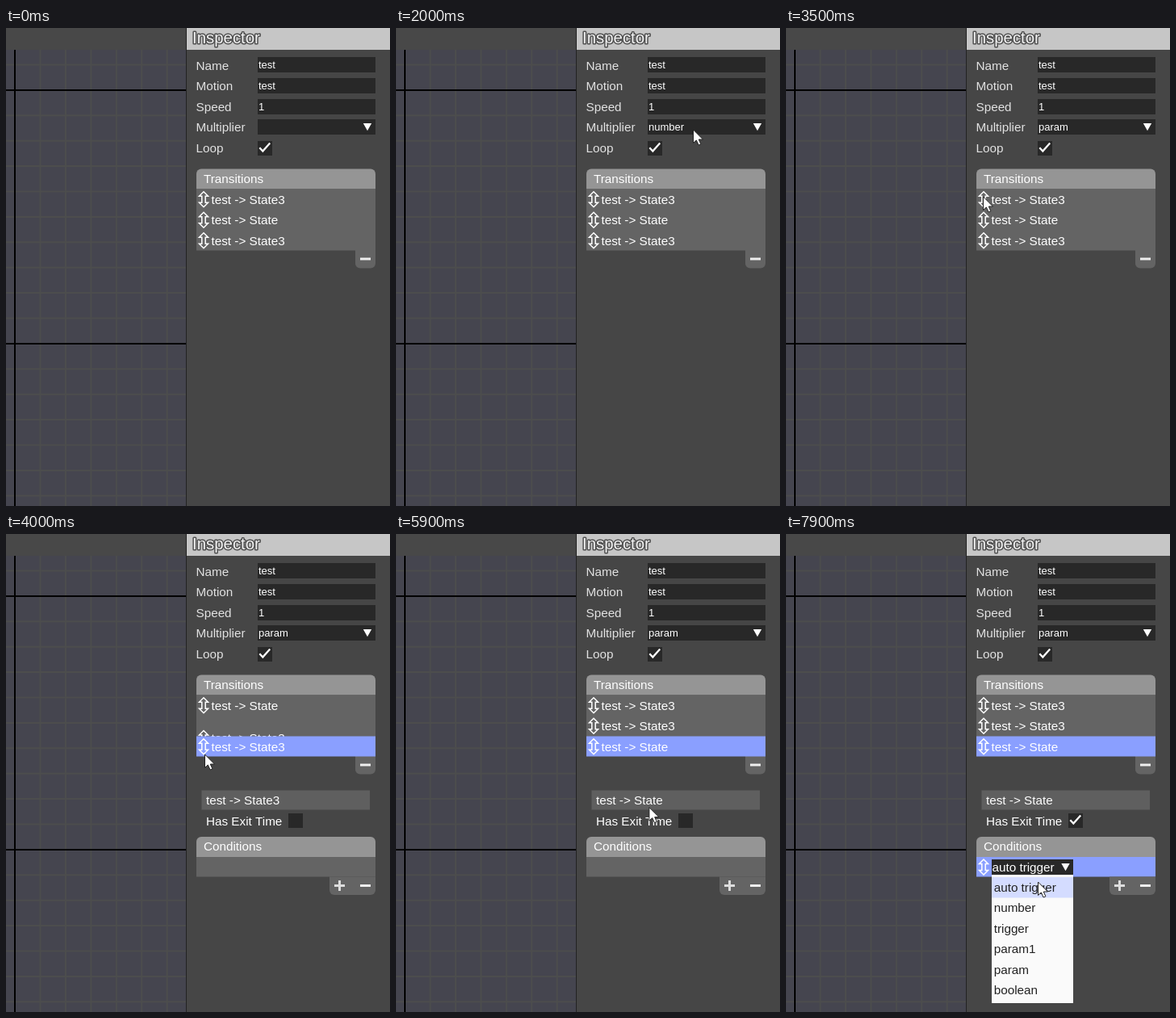
These frames come from a looping animation (476x592 px, 8000 ms). An HTML page with a canvas:

```html
<!DOCTYPE html>
<html>
<head>
<meta charset="utf-8">
<style>
html, body { margin: 0; width: 476px; height: 592px; overflow: hidden; background: #464646; }
canvas { display: block; }
</style>
</head>
<body>
<canvas id="stage" width="476" height="592"></canvas>
<script>
const g = document.getElementById('stage').getContext('2d');
const LOOP = 8000, TICK = 100, ROW = 25.5, LIST_TOP = 199.5;
const BLUE = '#8a9fff', GREY = '#646464', DARK = '#282828';
const FONT = 'px "Liberation Sans", Arial, sans-serif';

const clamp = (v, lo, hi) => Math.min(hi, Math.max(lo, v));
const ramp = (t, start, time) => clamp((t - start) / time, 0, 1);

// Pointer moves: depart, arrive, x, y
const moves = [
  [300, 600, 353, 120], [700, 1100, 362, 201], [1100, 1400, 366, 150], [1600, 2000, 369, 126],
  [2100, 2500, 368, 203], [2700, 3500, 245, 209], [3600, 3900, 247, 273], [4200, 4500, 246, 222],
  [4600, 5300, 249, 284], [5600, 6100, 358, 375], [6200, 6500, 357, 357], [6600, 6900, 416, 437],
  [7100, 7500, 321, 413], [7600, 7900, 313, 431]
];

function pointer(t) {
  let x = 464, y = 87;
  for (const [depart, arrive, toX, toY] of moves) {
    const p = ramp(t, depart, arrive - depart);
    x += (toX - x) * p;
    y += (toY - y) * p;
  }
  return [x, y];
}

// Rows a dragged item has followed the pointer
const drag = (t, grab, drop) =>
  clamp((pointer(clamp(t, grab, drop))[1] - pointer(grab)[1]) / ROW, 0, 2);

const transitions = [
  { name: 'test -> State3', slot: t => drag(t, 3600, 4200) - ramp(t, 5050, 250) },
  { name: 'test -> State', slot: t => 1 - ramp(t, 3700, 200) + drag(t, 4600, 5300) },
  { name: 'test -> State3', slot: t => 2 - ramp(t, 3900, 250) - ramp(t, 4800, 150) }
];

function box(x, y, w, h, color, radii = 0) {
  g.fillStyle = color;
  g.beginPath();
  g.roundRect(x, y, w, h, radii);
  g.fill();
}

function text(s, x, y, size = 15.25, color = '#fff') {
  g.font = size + FONT;
  g.fillStyle = color;
  g.fillText(s, x, Math.floor(y));
}

function shape(points, x, y, fill, stroke, width, open) {
  g.beginPath();
  points.forEach(([px, py]) => g.lineTo(x + px, y + py));
  if (!open) g.closePath();
  if (fill) { g.fillStyle = fill; g.fill(); }
  if (stroke) { g.strokeStyle = stroke; g.lineWidth = width; g.stroke(); }
}

const dropArrow = (x, y) => shape([[-5.2, -4.5], [5.2, -4.5], [0, 4.7]], x, y, '#fff');

function handle(y) {
  const half = [[0, -9.5], [5.5, -4], [2.2, -4], [2.2, 4], [5.5, 4]];
  shape(half.concat(half.map(([px, py]) => [-px, -py])), 245, y, null, '#fff', 1.5);
}

function checkbox(x, y, on) {
  box(x, y, 18, 18, DARK);
  if (on) shape([[2.3, 8.3], [6.3, 12.6], [15.2, 2.6]], x, y, null, '#fff', 2.3, true);
}

function header(s, y) {
  box(236, y, 222, 25, '#959595', [6, 6, 0, 0]);
  text(s, 245, y + 17.5);
}

function buttons(x, y, plus) {
  box(x, y, 458 - x, 22.5, GREY, [0, 0, 6, 6]);
  box(439, y + 9.5, 13, 3, '#eee');
  if (plus) {
    box(407, y + 9.5, 13, 3, '#ddd');
    box(412, y + 4.5, 3, 13, '#ddd');
  }
}

function list(items, x, y, w, pointerY) {
  box(x, y, w, items.length * ROW + 6, '#fafafa');
  items.forEach((s, i) => {
    const top = y + 3 + i * ROW;
    if (pointerY >= top && pointerY < top + ROW) box(x, top, w, ROW, '#d4dcff');
    text(s, x + 2.7, top + 18, 15.25, '#222');
  });
}

function grid() {
  box(0, 0, 223, 592, '#45454f');
  for (let i = 0; i < 18; i++) {
    box(10 + i * 31.45, 27, 2, 565, '#4c4d4d');
    box(0, 44.5 + i * 31.4, 223, 2, '#4c4d4d');
  }
  box(10, 27, 2, 565, '#000');
  box(0, 76, 223, 2, '#000');
  box(0, 390, 223, 2, '#000');
  box(0, 0, 223, 27, '#484848');
}

function fields(t) {
  box(223, 0, 253, 592, '#464646');
  box(223, 0, 1, 592, '#222');
  box(224, 0, 252, 27, '#c6c6c6');
  g.font = 20.4 + FONT;
  g.lineJoin = 'round';
  g.strokeStyle = '#505050';
  g.lineWidth = 3;
  g.strokeText('Inspector', 231, 19);
  text('Inspector', 231, 19, 20.4, '#f2f2f2');
  g.lineJoin = 'miter';

  const multiplier = t < 1700 ? '' : t < 2800 ? 'number' : 'param';
  const values = ['test', 'test', '1', multiplier];
  ['Name', 'Motion', 'Speed', 'Multiplier', 'Loop'].forEach((s, i) => {
    const y = Math.floor(36.8 + i * 25.6);
    text(s, 235.5, 52 + i * 25.6, 15.25, '#e2e2e2');
    if (i === 4) return checkbox(312, y + 1, true);
    box(312, y, 146, 19, DARK);
    text(values[i], 313, y + 14, 13);
  });
  dropArrow(448, 122.5);
}

function transitionList(t) {
  header('Transitions', 174.5);
  box(236, LIST_TOP, 222, 75.5, GREY);
  buttons(433, 275, false);
  const picked = t < 3600 ? null : transitions[t < 4600 ? 0 : 1];
  const row = item => {
    const y = LIST_TOP + item.slot(t) * ROW;
    box(236, y, 222, 25, item === picked ? BLUE : GREY);
    handle(y + 12.7);
    text(item.name, 254.5, y + 18.5);
  };
  transitions.filter(item => item !== picked).forEach(row);
  if (picked) row(picked);
  return picked;
}

function details(t, picked, pointerY) {
  box(242.5, 317.5, 208.5, 24, '#5f5f5f');
  text(picked.name, 248, 335);
  text('Has Exit Time', 248, 361);
  checkbox(350, 346, t >= 6600);
  header('Conditions', 375);
  const open = t >= 7600;
  box(236, 400, 222, 24.5, open ? BLUE : GREY);
  buttons(401, 424.5, true);
  if (t < 7100) return;
  handle(412.5);
  box(255, 403, 101, 19, DARK);
  text('auto trigger', 255.5, 418);
  dropArrow(346.5, 412.5);
  if (open) list(['auto trigger', 'number', 'trigger', 'param1', 'param', 'boolean'], 255, 422, 101, pointerY);
}

function draw(t) {
  const [x, y] = pointer(t);
  grid();
  fields(t);
  const picked = transitionList(t);
  if (picked) details(t, picked, y);
  if (t >= 800 && t < 1700 || t >= 2100 && t < 2800) list(['number', 'param1', 'param'], 312, 132, 146, y);
  if (t >= 300) {
    shape([[0, 0], [0, 16.5], [3.8, 13], [6.6, 19], [9.4, 17.8], [6.8, 12], [12, 12]],
      x - 0.5, y, '#fff', '#222', 1);
  }
}

function frame(now) {
  draw(Math.floor(now % LOOP / TICK) * TICK);
  requestAnimationFrame(frame);
}
requestAnimationFrame(frame);
</script>
</body>
</html>
```
